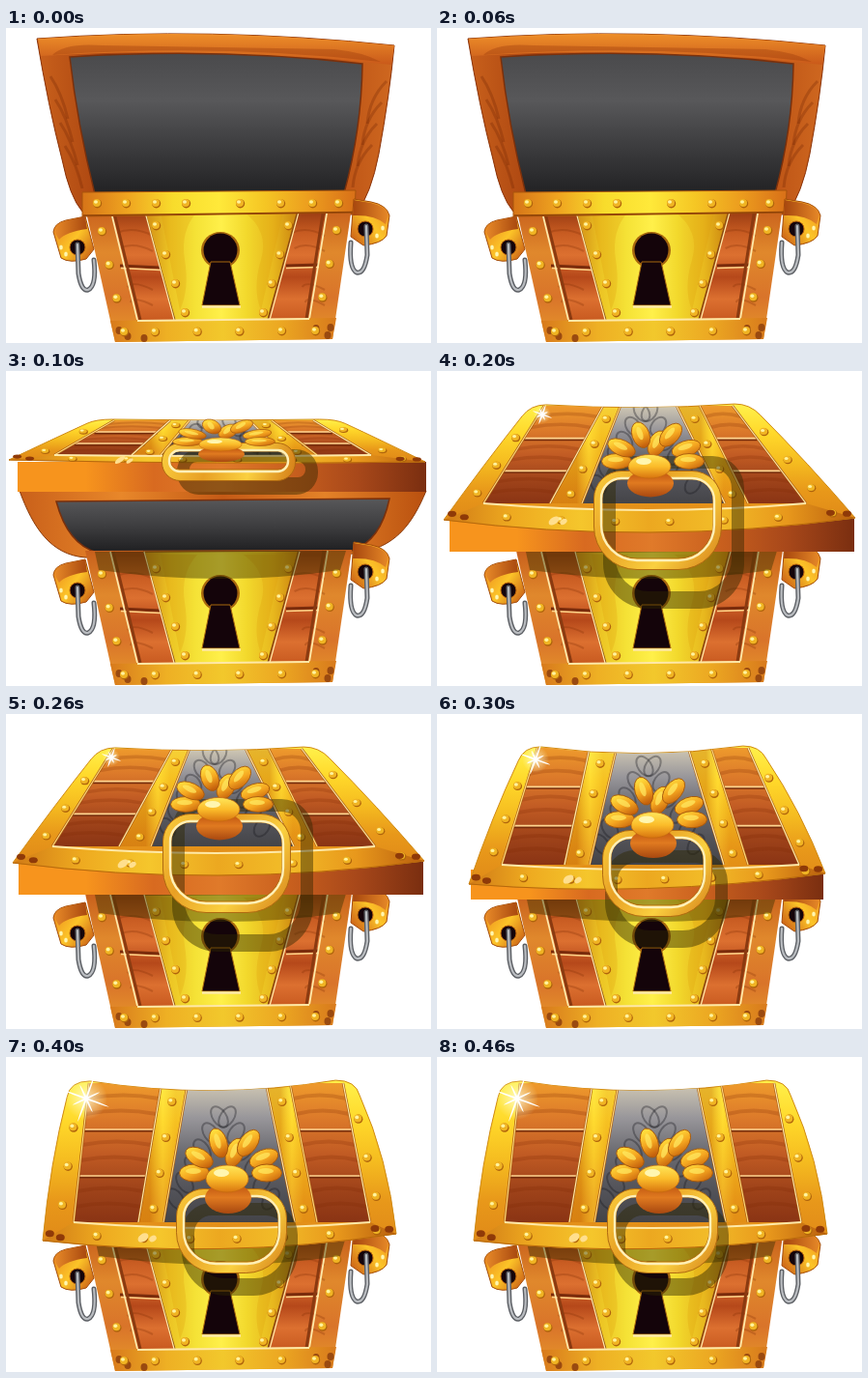
Recreate the animation shown at these times as an HTML page with a canvas. Size 440 by 326 pixels, loop 500 ms.

```html
<!DOCTYPE html>
<html>
<head>
<meta charset="utf-8">
<style>
html, body { margin: 0; width: 100%; height: 100%; overflow: hidden; background: #fff }
canvas { display: block }
</style>
</head>
<body>
<canvas id="stage" width="440" height="326"></canvas>
<script>
const ctx = document.getElementById('stage').getContext('2d');
const CREAM = '#ffe9a8', DARK = '#14040a', SHADE = 'rgba(60,52,0,.45)';

// Lid poses: corners, then x of the six inner edges at the top and at the front rail
const poses = [
  { tl: [93, 50], tr: [342, 50], bl: [3, 92], br: [434, 94], sag: 2, dip: 2, y0: 51, y1: 87,
    top: [112, 170, 190, 252, 275, 318], low: [50, 130, 160, 288, 322, 378],
    knob: [222, 75], squash: .5, ring: [166, 79, 129, 30], shadow: [184, 88, 132, 33],
    slab: [12, 94, 423, 31], spot: [122, 92] },
  { tl: [97, 35], tr: [324, 34], bl: [7, 154], br: [433, 152], sag: 14, dip: 6, y0: 36, y1: 137,
    top: [111, 172, 190, 248, 272, 306], low: [48, 117, 150, 298, 322, 382],
    knob: [220, 97], squash: .88, ring: [167, 108, 123, 93], shadow: [179, 95, 132, 144],
    slab: [13, 153, 419, 34], spot: [125, 155], star: [109, 45, 9] },
  { tl: [90, 34], tr: [334, 33], bl: [33, 176], br: [402, 165], sag: 10, dip: 14, y0: 35, y1: 156,
    top: [104, 158, 186, 260, 284, 322], low: [67, 132, 158, 297, 322, 375],
    knob: [223, 113], squash: .95, ring: [176, 125, 104, 80], shadow: [181, 148, 113, 87],
    slab: [35, 161, 365, 31], spot: [140, 171], star: [102, 47, 14] },
  { tl: [66, 25], tr: [362, 24], bl: [38, 190], br: [404, 183], sag: 12, dip: 20, y0: 27, y1: 171,
    top: [86, 161, 188, 269, 294, 349], low: [70, 137, 163, 299, 322, 377],
    knob: [229, 124], squash: 1, ring: [181, 141, 105, 78], shadow: [189, 158, 106, 82],
    spot: [146, 187], star: [83, 43, 22] }
];

function paint(d, fill, stroke, width = 1) {
  const path = typeof d === 'string' ? new Path2D(d) : d;
  if (fill) { ctx.fillStyle = fill; ctx.fill(path, 'evenodd'); }
  if (stroke) { ctx.strokeStyle = stroke; ctx.lineWidth = width; ctx.stroke(path); }
}
function grad(x0, y0, x1, y1, ...colors) {
  const g = ctx.createLinearGradient(x0, y0, x1, y1);
  colors.forEach((c, i) => g.addColorStop(i / (colors.length - 1), c));
  return g;
}
function oval(x, y, rx, ry, fill, stroke, width, turn = 0) {
  const p = new Path2D();
  p.ellipse(x, y, rx, ry, turn, 0, 7);
  paint(p, fill, stroke, width);
}
const poly = pts => 'M' + pts.map(p => p.join(' ')).join('L') + 'Z';
const mix = (a, b, t) => a + (b - a) * t;
const between = (p, q, t) => [mix(p[0], q[0], t), mix(p[1], q[1], t)];

function rivet(x, y, s = 1) {
  oval(x + .6, y + .8, 4.6, 4.6 * s, '#b0650c');
  oval(x, y, 4, 4 * s, '#f0b423');
  oval(x - 1, y - s, 2, 1.8 * s, '#fff3a0');
}
// Rivets spaced evenly on the line from p to q
function rivets(p, q, n, s) {
  for (let i = 0; i < n; i++) rivet(...between(p, q, i / (n - 1)), s);
}

function body() {
  paint('M82 186L358 185 338 322 113 325Z', grad(0, 186, 0, 325, '#c8601c', '#e0882c', '#d9742a', '#e89a2a'));
  paint('M107 187L333 186 314 302 136 303Z', grad(0, 190, 0, 303, '#9a3c12', '#c85c22', '#dc7030', '#b5481a', '#dc7030', '#c85a20'));
  for (const [x, end] of [[112, 152], [293, 330]])
    for (const y of [212, 228, 268, 284])
      paint(`M${x + (y - 200) / 5} ${y}Q${(x + end) / 2} ${y - 7} ${end} ${y + 3}`, null, 'rgba(120,40,0,.25)', 2);
  paint('M118 246L160 248M290 246L324 245', null, '#7a2c0c', 3);
  paint('M119 248.5L160 250.5M290 248.5L324 247.5', null, '#ffd58a', 1.6);
  paint('M111 187L139 302M329 186L311 301', null, '#8a3a10', 3);
  paint('M108 187L136 302M333 186L314 301', null, CREAM, 1.8);
  paint('M143 187L303 186 271 302 175 303Z', grad(143, 0, 303, 0, '#d08a14', '#ecc424', '#f5e236', '#fff04a', '#f2d82c', '#e8b81e', '#c8800e'), '#8a4a10', 1.5);
  paint('M160 190L180 292Q190 270 185 240T198 190ZM287 190L264 292Q255 270 264 240T246 190Z', 'rgba(220,150,10,.25)');
  paint('M143 187L174 302M304 187L273 302', null, CREAM, 1.2);
  paint('M108 303L342 300 338 322 113 325Z', grad(108, 0, 342, 0, '#d87a1c', '#eeb024', '#f2c82c', '#eca822', '#d87a1c'));
  paint('M136 303L314 301', null, CREAM, 1.8);
  for (const [x, y] of [[117, 313], [126, 319], [143, 321], [321, 311], [333, 318], [336, 310]])
    oval(x, y, 3.5, 4, '#9a4a10');
  rivets([99, 210], [122, 314], 4);
  rivets([342, 209], [320, 313], 4);
  rivets([155, 204], [185, 294], 4);
  rivets([292, 204], [266, 294], 4);
  rivets([154, 314], [285, 313], 4);
  oval(222, 230, 20, 19, '#a8680e');
  oval(222, 230, 17.5, 17.5, DARK);
  paint('M212 242H232L242 287H203Z', DARK, '#a8680e', 1);
  paint('M203 288.5H243', null, CREAM, 2.5);
}

function lugs() {
  paint('M49 211Q50 202 62 199L82 195 91 229 83 239Q66 244 57 238Z', grad(50, 210, 88, 235, '#ee9420', '#fcc428', '#d06a18'), '#a34b0a');
  paint('M50 211Q51 202 63 199L82 195 84 208Q62 211 55 219Z', grad(50, 0, 84, 0, '#e88a28', '#a8480f'));
  paint('M397 194Q394 183 378 180L360 177 357 216 370 225Q389 223 394 215Z', grad(398, 190, 360, 218, '#ee9420', '#fcc428', '#d06a18'), '#a34b0a');
  paint('M396 193Q392 184 378 181L360 178 359 194Q382 193 393 203Z', grad(397, 0, 360, 0, '#e88a28', '#a8480f'));
  oval(74, 227, 8, 8, DARK, '#b8600c', 1);
  oval(372, 208, 8, 8, DARK, '#b8600c', 1);
  ctx.lineCap = 'round';
  for (const d of ['M74 224L75 254Q78 273 85 271Q94 267 91 240', 'M373 205L374 235Q371 255 363 253Q355 249 357 222']) {
    paint(d, null, '#5c5f64', 5);
    paint(d, null, '#b9bcc0', 2.2);
  }
  ctx.lineCap = 'butt';
  for (const [x, y] of [[57, 227], [62, 234], [390, 207], [384, 215]]) oval(x, y, 1.8, 2.5, '#fff6b0');
}

function openLid() {
  paint('M32 11Q210 -2 402 18Q397 70 386 130Q378 172 362 193L79 190Q66 175 58 136Q44 82 32 11Z',
    grad(32, 0, 402, 0, '#c9611c', '#a8420f', '#d2641c', '#d97322', '#b74d12', '#cf6820'), '#8a3208');
  paint('M33 11Q210 -2 402 18L399 38Q220 18 36 29Z', grad(0, 4, 0, 38, '#f0922a', '#c9591a'));
  paint('M48 28Q60 15 100 18L340 22Q370 25 388 35Q220 16 48 28Z', 'rgba(150,55,10,.35)');
  for (let i = 0; i < 4; i++)
    paint(`M${46 + i * 5} ${50 + i * 24}q12 18 18 44M${394 - i * 5} ${55 + i * 22}q-18 18 -20 44`, null, 'rgba(110,35,0,.28)', 3);
  paint('M66 30Q220 20 369 37Q368 105 350 171L92 172Q74 100 66 30Z', grad(0, 27, 0, 171, '#4a4a4c', '#58585a', '#3c3c3e', '#222224'), '#7a300c', 1.5);
}

function topRail() {
  paint('M79 170L362 168 361 191 79 195Z', grad(79, 0, 362, 0, '#d67418', '#efa520', '#f8dc2c', '#ffe93a', '#f5c624', '#ec9c1e', '#d87018'), '#a8540c');
  paint('M80 194L361 190.5', null, '#8f4308', 1.5);
  for (const x of [94, 124, 155, 186, 242, 284, 317, 344]) rivet(x, 181);
}

function inside() {
  paint('M14 124H435C420 160 402 184 360 189L82 193C46 190 28 162 14 124Z', grad(14, 0, 435, 0, '#c9601a', '#e8872a', '#c45a16', '#e48228', '#b9500f'), '#8a3a0a');
  paint('M52 135L397 132Q388 176 358 186L95 188Q64 180 52 135Z', grad(0, 132, 0, 188, '#58585a', '#3e3e40', '#1e1e20'), '#7a300c', 1.5);
}

// Rounded loop grown by g, with softer corners at the bottom
function loop(path, [x, y, w, h], g, drop = 0) {
  const width = w + g * 2, height = h + g * 2 + drop;
  const r = k => Math.min(k + g, height * .48);
  path.roundRect(x - g, y - g, width, height, [r(24), r(26), r(40), r(40)]);
  return path;
}
// Closed band, heavier along the bottom
const band = (box, out, inn, drop) => loop(loop(new Path2D(), box, out), box, -inn, -drop);

function flower({ knob, squash }) {
  ctx.save();
  ctx.translate(...knob);
  ctx.scale(1, squash);
  for (const [x, y] of [[-34, -4], [-29, -20], [38, -19], [41, -4], [8, -25], [-9, -35], [22, -35]]) {
    const turn = Math.atan2(y + 4, x);
    oval(x, y, 15.5, 9, grad(x - 6, y - 11, x + 6, y + 12, '#ffdc3c', '#f5a620', '#c4600c'), '#a85a0c', 1, turn);
    oval(x - 1, y - 2, 8, 3, 'rgba(255,235,100,.7)', null, 0, turn);
  }
  oval(1, 22, 24, 16, grad(0, 5, 0, 38, '#b84c0c', '#e07a20', '#a84810'));
  oval(0, 2, 22, 14, grad(0, -12, 0, 16, '#ffe65a', '#fbbc2a', '#d8740f'), '#c46a10', .8);
  oval(-6, -4, 8, 4, '#fff6b0');
  ctx.restore();
}

function lid(p) {
  const { tl, tr, bl, br, y0, y1, top, low, sag, dip, squash } = p;
  const edge = (i, v) => [mix(top[i], low[i], v), mix(y0, y1, v)];
  const strip = (i, a = 0, b = 1) => poly([edge(i, a), edge(i + 1, a), edge(i + 1, b), edge(i, b)]);
  const mid = (bl[0] + br[0]) / 2, midY = (bl[1] + br[1]) / 2 + sag * 2;

  if (p.slab) {
    const [x, y, w, h] = p.slab;
    ctx.fillStyle = grad(x, 0, x + w, 0, '#f7941d', '#f7941d', '#d86a20', '#e07a2a', '#c9601e', '#a8481a', '#7a2e10');
    ctx.fillRect(x, y, w, h);
  }

  const a = between(bl, tl, .9), b = between(tl, tr, .07), c = between(tl, tr, .93), d = between(br, tr, .9);
  const [lx, ly] = between(a, bl, .45), [rx, ry] = between(d, br, .45), bulge = dip * .6;
  const outline = new Path2D(`M${bl}Q${lx - bulge / 2} ${ly} ${a}Q${tl} ${b}Q${(b[0] + c[0]) / 2} ${tl[1] + dip} ${c}Q${tr} ${d}` +
    `Q${rx + bulge} ${ry} ${br}Q${mid} ${midY} ${bl}Z`);
  paint(outline, grad(0, tl[1], 0, bl[1], '#fff04a', '#ffd82a', '#f5bc20', '#e8981a', '#e08a18'), '#d08a14', 1);

  ctx.save();
  ctx.clip(outline);
  // Planked panels
  for (const i of [0, 4]) {
    paint(strip(i), grad(0, y0, 0, y1, '#ee9a2c', '#dc7a2a', '#c25c24', '#a0441a', '#8a3414'));
    for (let k = 1; k < 9; k++) {
      const l = edge(i, k / 9), r = edge(i + 1, k / 9);
      if (k % 3) {
        paint(`M${l}Q${(l[0] + r[0]) / 2} ${l[1] - 7 * squash} ${r}`, null, 'rgba(125,40,0,.22)', 4 * squash);
      } else {
        paint(`M${l[0]} ${l[1] + 1.5}L${r[0]} ${r[1] + 1.5}`, null, '#752c0c', 2);
        paint(`M${l}L${r}`, null, '#ffd590', 1.6);
      }
    }
  }

  // Straps with a shaded outer side
  for (const i of [1, 3]) {
    const [x, y] = edge(i, .5), [x2, y2] = edge(i + 1, .5);
    paint(strip(i), grad(x, y, x2, y2, 'rgba(200,110,10,.45)', 'rgba(255,225,60,.3)', 'rgba(225,140,15,.3)'));
  }

  // Dark centre with faint scrollwork
  const centre = strip(2);
  paint(centre, grad(0, y0, 0, y1, '#d0c8b4', '#98969a', '#6a6a70', '#54545a', '#444448'));
  ctx.save();
  ctx.clip(new Path2D(centre));
  const [kx, ky] = p.knob;
  for (let i = 0; i < 12; i++) {
    const side = i % 2 ? 1 : -1, row = i >> 1;
    oval(kx - 4 + side * (4 + row * 9), ky + (row * 17 - 62) * squash, 7, 12 * squash, null, 'rgba(25,25,30,.35)', 2, side * .6);
  }
  ctx.restore();

  for (let i = 0; i < 6; i++) {
    paint(`M${edge(i, 0)}L${edge(i, 1)}`, null, '#a85a14', 2.4);
    paint(`M${edge(i, 0)}L${edge(i, 1)}`, null, i % 2 ? CREAM : '#ffd878', 1.2);
  }
  ctx.restore();

  // Front rail
  const l = edge(0, 1), r = edge(5, 1), lineMid = y1 + sag;
  paint(`M${l}Q${mid} ${lineMid} ${r}L${br}Q${mid} ${midY} ${bl}Z`,
    grad(bl[0], 0, br[0], 0, '#d07a16', '#eeaa20', '#f5c62c', '#eca820', '#f2bc28', '#e8981c', '#b9600e'));
  paint(`M${l}Q${mid} ${lineMid} ${r}`, null, CREAM, 2);
  paint(`M${bl}Q${mid} ${midY} ${br}`, null, '#b8680c', 1);

  const s = Math.max(.6, squash);
  for (let i = 1; i < 8; i++) {
    const t = .02 + i * .132, bow = 4 * t * (1 - t);
    const upper = y1 + bow * sag / 2, lower = mix(bl[1], br[1], t) + bow * sag;
    rivet(mix(bl[0], br[0], t), (upper + lower) / 2, s);
  }
  for (const [x, y] of [[.02, -7], [.05, -3], [.94, -6], [.98, -5]])
    oval(mix(bl[0], br[0], x), mix(bl[1], br[1], x) + y * squash, 4.5, 3.5 * s, '#8f3a08');
  oval(p.spot[0] - 4, p.spot[1], 6, 4 * s, '#ffdf8e', null, 0, -.6);
  oval(p.spot[0] + 6, p.spot[1] + 1, 4, 3 * s, '#ffdf8e', null, 0, -.6);

  const n = squash < .6 ? 3 : 4;
  const halfway = (i, v) => between(edge(i, v), edge(i + 1, v), .5);
  for (const i of [1, 3]) rivets(halfway(i, .13), halfway(i, .9), n, s);
  const side = (corner, foot, i, v) => between(between(corner, foot, v), edge(i, v), .5);
  rivets(side(tl, bl, 0, .3), side(tl, bl, 0, .82), n - 1, s);
  rivets(side(tr, br, 5, .25), side(tr, br, 5, .78), n - 1, s);

  // Handle
  const [x, y, w, h] = p.ring;
  paint(band(p.shadow, 7, 6, 5), 'rgba(45,38,0,.45)');
  paint(band(p.ring, 4.5, 4, 3), grad(x, y, x + w, y + h, '#f8c83a', '#e8a024', '#fad040', '#d8861c'), '#b06a10', 1);
  paint(loop(new Path2D(), p.ring, -3, -2), null, '#fff0b8', 2.4);
  flower(p);

  if (p.star) {
    const [sx, sy, size] = p.star;
    const glow = ctx.createRadialGradient(sx, sy, 0, sx, sy, size);
    glow.addColorStop(0, '#fff');
    glow.addColorStop(.25, 'rgba(255,255,220,.6)');
    glow.addColorStop(1, 'rgba(255,255,200,0)');
    oval(sx, sy, size, size, glow);
    for (let i = 0; i < 4; i++) oval(sx, sy, i % 2 ? size * .7 : size * 1.15, .9, '#fff', null, 0, .35 + i * Math.PI / 4);
  }
}

function draw(step) {
  ctx.fillStyle = '#fff';
  ctx.fillRect(0, 0, 440, 326);
  if (step === 0) openLid();
  if (step === 1) inside();
  body();
  if (step === 0) topRail();
  lugs();
  if (step > 0) {
    paint('M92 187L352 186 346 206Q225 224 96 206Z', SHADE);
    lid(poses[step - 1]);
  }
}

let shown = -1;
function tick(now) {
  const step = Math.floor(now / 100) % 5;
  if (step !== shown) draw(shown = step);
  requestAnimationFrame(tick);
}
tick(performance.now());
</script>
</body>
</html>
```
